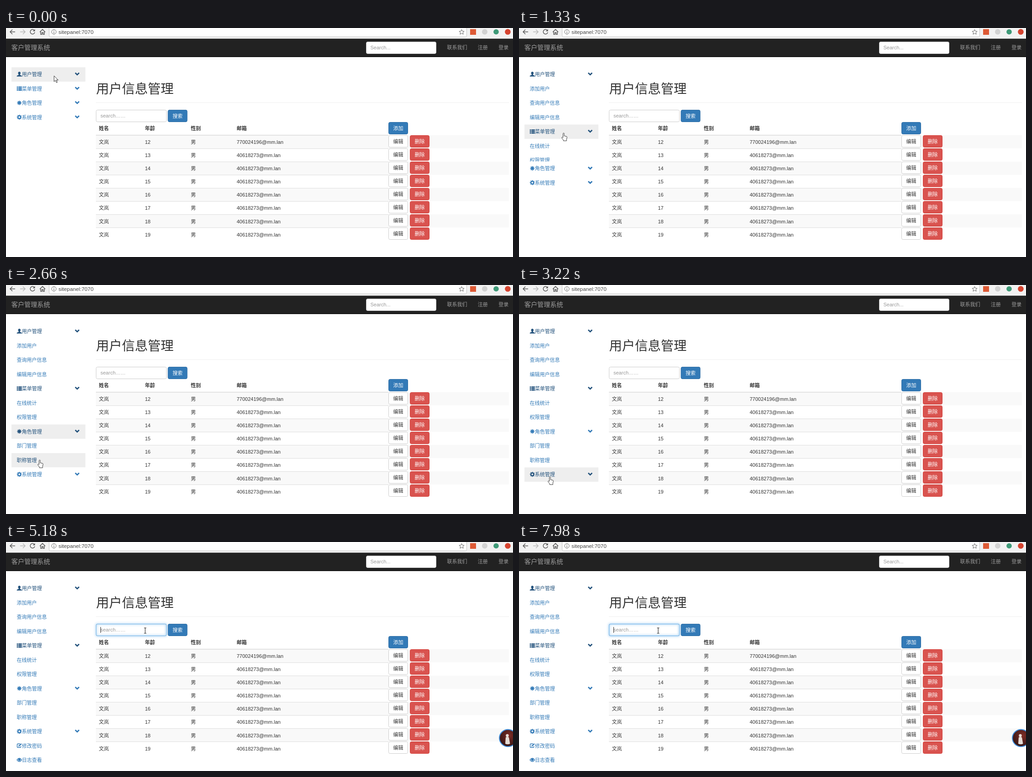
Recreate the animation shown at these times as an HTML page. Size 1111 by 504 pixels, loop 8 s.

```html
<!DOCTYPE html>
<html lang="zh-CN">
<head>
<meta charset="utf-8">
<title>客户管理系统</title>
<style>
  html, body { margin: 0; width: 100%; height: 100%; overflow: hidden; background: #fff; }
  #stage { display: block; width: 1111px; height: 504px; }
  text { font: 11px "Liberation Sans", "Noto Sans CJK SC", "Noto Sans CJK", sans-serif; fill: #333; white-space: pre; }
  .mid { text-anchor: middle; }
  .bold { font-weight: 700; }
  .nav { fill: #9d9d9d; }
  .hint { fill: #999; }
  .link { color: #337ab7; }
  .link.dark { color: #23527c; }
  .link text { fill: currentColor; }
  .link .bg { fill: none; }
  .link.on .bg { fill: #eee; }
  .line { fill: none; stroke: #5a5a5a; stroke-width: 1.5; }
</style>
</head>
<body>
<svg id="stage" viewBox="0 0 1111 504">
  <defs>
    <filter id="soft" x="-10%" y="-50%" width="120%" height="200%"><feGaussianBlur stdDeviation="2.4"/></filter>
    <radialGradient id="photo" cx=".6" cy=".35" r=".75">
      <stop offset="0" stop-color="#7d2c25"/><stop offset="1" stop-color="#2c1414"/>
    </radialGradient>
    <g id="user" fill="currentColor">
      <ellipse cy="-2.4" rx="2.7" ry="3.1"/>
      <path d="M-1.5 0h3v1.6l3.4 1.5q.7.4.7 2H-5.6q0-1.6.7-2l3.4-1.5z"/>
    </g>
    <path id="list" fill="currentColor" d="M-5.5-4.5h2.6v2.6h-2.6zM-2-4.5h7.5v2.6H-2zM-5.5-1.2h2.6v2.6h-2.6zM-2-1.2h7.5v2.6H-2zM-5.5 2.1h2.6v2.6h-2.6zM-2 2.1h7.5v2.6H-2z"/>
    <path id="star" fill="none" stroke="currentColor" stroke-width="1.9" d="M0-4.8V4.8M-4.8 0H4.8M-3.4-3.4 3.4 3.4M-3.4 3.4 3.4-3.4"/>
    <g id="cog" fill="none" stroke="currentColor">
      <circle r="3" stroke-width="2.3"/>
      <circle r="4.6" stroke-width="1.8" stroke-dasharray="1.8 1.813" stroke-dashoffset=".9"/>
    </g>
    <g id="edit" fill="none" stroke="currentColor" stroke-width="1.4">
      <path d="M2-4H-3.4q-1.3 0-1.3 1.3v5.4q0 1.3 1.3 1.3h5.4q1.3 0 1.3-1.3V1"/>
      <path stroke-width="2.2" d="M-1.6 1.4 4.8-4.2"/>
    </g>
    <g id="eye" fill="none" stroke="currentColor" stroke-width="1.3">
      <path d="M-5.2 0Q0-7.4 5.2 0 0 7.4-5.2 0z"/>
      <circle cy="-.5" r="2" fill="currentColor"/>
    </g>
  </defs>

  <rect width="1111" height="504" fill="#fff"/>
  <g id="browser">
    <rect width="1111" height="23.5" fill="#f2f2f2"/>
    <path d="M94.5-1V16.500q0 3 3 3H1006.500q3 0 3-3V-1z" fill="#fff" stroke="#c4c4c4"/>
    <path class="line" d="M20 8.500H9M14 3.500 9 8.500l5 5"/>
    <path class="line" style="stroke:#b9b9b9" d="M31 8.500H42M37 3.500l5 5-5 5"/>
    <path class="line" d="M62 5.200A5 5 0 1 0 63 9.500"/>
    <path d="M63.500 2.500v4.700h-4.700z" fill="#5a5a5a"/>
    <path class="line" d="M74 9 80 3l6 6M76 8v6h2.800v-4h2.500v4H84V8"/>
    <circle cx="105" cy="8.500" r="5" fill="none" stroke="#666"/>
    <path d="M105 7.800V11.500M105 5.300V6.600" stroke="#666" stroke-width="1.200"/>
    <path d="M998.500 3.300l1.600 3.700 4 .3-3 2.600 1 4-3.600-2.200-3.600 2.200 1-4-3-2.600 4-.3z" fill="none" stroke="#666"/>
    <rect x="1017" y="2.500" width="13" height="12.500" fill="#dd5a35"/>
    <circle cx="1049" cy="8.500" r="6" fill="#d2d2d2"/>
    <circle cx="1074" cy="8.500" r="5.800" fill="#3f9a78"/>
    <circle cx="1099.500" cy="8.500" r="6.300" fill="#d5432f"/>
  </g>
  <g id="page">
    <rect y="23.500" width="1111" height="40.500" fill="#222"/>
    <rect y="62.800" width="1111" height="1.200" fill="#080808"/>
  </g>
  <g id="menu"></g>
  <g id="avatar">
    <circle cx="1100" cy="431.500" r="18.800" fill="url(#photo)" stroke="#3d8bd8" stroke-width="2"/>
    <circle cx="1098.500" cy="426" r="3.200" fill="#e5dcd5"/>
    <path d="M1095 430q4-2 7 0l2.500 14q-5 2.500-10.500 0z" fill="#e5dcd5"/>
  </g>
  <g id="focus">
    <rect x="197.500" y="180.500" width="154" height="26" rx="3" fill="none" stroke="#66afe9" stroke-width="3" opacity=".6" filter="url(#soft)"/>
    <rect x="197.500" y="180.500" width="154" height="26" rx="3" fill="none" stroke="#66afe9"/>
  </g>
  <rect id="caret" x="207" y="187" width="1" height="13" fill="#222"/>
  <g id="pointer">
    <path id="arrow" d="M.3.300V13l3-2.700 2.200 5 2-.9-2.200-4.900h4z" fill="#fff" stroke="#222" stroke-width=".9"/>
    <path id="hand" d="M-1.500 10V1.500a1.300 1.300 0 0 1 2.600 0V6.500l5 1.100q1.300.4 1.100 2l-1 5v2.700H-.8v-1.800L-4.600 10.500q.6-2 2-.9z" fill="#fff" stroke="#222" stroke-width=".9"/>
    <path id="beam" d="M-2.500-6H-.6L0-5.500.6-6H2.500M0-5.500V5.500M-2.500 6H-.6L0 5.500.6 6H2.500" fill="none" stroke="#222" stroke-width="1.100"/>
  </g>
</svg>
<script>
const LOOP = 8000, STEP = 70, ROW = 31.5, TOP = 86.5;
const $ = id => document.getElementById(id);

function add(parent, tag, attrs, content) {
  const el = document.createElementNS('http://www.w3.org/2000/svg', tag);
  for (const k in attrs) el.setAttribute(k, attrs[k]);
  if (content) el.textContent = content;
  parent.appendChild(el);
  return el;
}

// Page content
const page = $('page');
const text = (x, y, s, cls = '', size = 11) =>
  add(page, 'text', { x, y, class: cls, style: `font-size:${size}px` }, s);
const box = (x, y, width, fill, stroke) =>
  add(page, 'rect', { x: x + .5, y: y + .5, width: width - 1, height: 26, rx: 3, fill, stroke });
function button(x, y, label, fill, stroke, color = '#fff') {
  box(x, y, 43, fill, stroke);
  text(x + 21.5, y + 17.5, label, 'mid').style.fill = color;
}

add($('browser'), 'text', { x: 115, y: 12.7, style: 'font-size:11.8px;fill:#444' }, 'sitepanel:7070');
text(11.8, 48.2, '客户管理系统', 'nav', 14.15);
box(789, 30, 154, '#fff', '#ccc');
text(798.5, 47.3, 'Search...', 'hint');
[[966.5, '联系我们'], [1033.7, '注册'], [1079.3, '登录']].forEach(([x, s]) => text(x, 47.2, s, 'nav'));

text(197.5, 144.3, '用户信息管理', '', 28.3);
add(page, 'rect', { x: 197, y: 163.5, width: 905, height: 1, fill: '#eee' });
box(197, 180, 155, '#fff', '#ccc');
text(207, 197.3, 'search……', 'hint');
button(354.5, 180, '搜索', '#337ab7', '#2e6da4');

const cols = [203.5, 304.5, 405, 505.5];
['姓名', '年龄', '性别', '邮箱'].forEach((s, i) => text(cols[i], 225.2, s, 'bold'));
for (let i = 0; i < 8; i++) {
  const y = 236 + i * 29.05, line = Math.round(y);
  if (i % 2 === 0) add(page, 'rect', { x: 197, y: line, width: 905, height: 29, fill: '#f9f9f9' });
  add(page, 'rect', { x: 197, y: line - (i ? 0 : 1), width: 641, height: i ? 1 : 1.6, fill: '#ddd' });
  const mail = i ? '40618273@mm.lan' : '770024196@mm.lan';
  ['文岚', 12 + i, '男', mail].forEach((s, c) => text(cols[c], y + 19.2, s));
}
button(838, 207, '添加', '#337ab7', '#2e6da4');
for (let i = 0; i < 8; i++) {
  const y = Math.round(236 + i * 29.05);
  button(838, y, '编辑', '#fff', '#ccc', '#333');
  button(885, y, '删除', '#d9534f', '#d43f3a');
}

// Side menu: when each section opens, gains and loses focus
const sections = [
  { icon: 'user', name: '用户管理', open: 100, from: 0, to: 1120, keep: true, subs: [['添加用户'], ['查询用户信息'], ['编辑用户信息']] },
  { icon: 'list', name: '菜单管理', open: 1160, from: 1120, to: 2030, keep: true, subs: [['在线统计'], ['权限管理']] },
  { icon: 'star', name: '角色管理', open: 2150, from: 2030, to: 3220, subs: [['部门管理'], ['职称管理']] },
  { icon: 'cog', name: '系统管理', open: 3340, from: 3220, to: 5110, subs: [['修改密码', 'edit'], ['日志查看', 'eye']] }
];

function link(parent, y, name, icon) {
  const g = add(parent, 'g', { class: 'link', transform: `translate(0 ${y})` });
  add(g, 'rect', { class: 'bg', x: 12, width: 162, height: ROW });
  if (icon) add(g, 'use', { href: '#' + icon, x: 29.2, y: 15.2 });
  add(g, 'text', { x: icon ? 34.7 : 23.6, y: 19.7 }, name);
  return g;
}

for (const s of sections) {
  s.g = add($('menu'), 'g', {});
  s.head = link(s.g, 0, s.name, s.icon);
  add(s.head, 'path', { d: 'M151.800 12.300 156 16.400l4.200-4.100', fill: 'none', stroke: 'currentColor', 'stroke-width': 2.8 });
  s.clip = add(s.g, 'svg', { x: 0, y: ROW, width: 180, height: 0, overflow: 'hidden' });
  s.items = s.subs.map(([name, icon], i) => link(s.clip, i * ROW, name, icon));
}

// CSS "ease" curve: cubic-bezier(.25, .1, .25, 1)
function ease(x) {
  if (x <= 0) return 0;
  if (x >= 1) return 1;
  const bez = (a, b, u) => 3 * a * u * (1 - u) ** 2 + 3 * b * u * u * (1 - u) + u ** 3;
  let lo = 0, hi = 1;
  for (let i = 0; i < 20; i++) {
    const u = (lo + hi) / 2;
    if (bez(.25, .25, u) < x) lo = u; else hi = u;
  }
  return bez(.1, 1, lo);
}

// Pointer tip: time, x, y
const path = [
  [0, 105, 105], [140, 105, 105], [560, 101, 147], [910, 98, 231], [1470, 98, 231],
  [1890, 95, 325], [2240, 95, 325], [2520, 84, 352], [2660, 74, 385], [2870, 70, 437],
  [3010, 68, 422], [3570, 68, 422], [3920, 303, 224], [3990, 306, 216], [4130, 320, 204.5],
  [4270, 320, 204.5], [4550, 305, 194.5], [LOOP, 305, 194.5]
];
function tipAt(t) {
  const i = path.findIndex(p => p[0] > t);
  const [t0, x0, y0] = path[i - 1], [t1, x1, y1] = path[i];
  const k = (t - t0) / (t1 - t0);
  return [x0 + (x1 - x0) * k, y0 + (y1 - y0) * k];
}

const show = (id, on) => { $(id).style.display = on ? '' : 'none'; };

function render(t) {
  const [x, y] = tipAt(t);
  const over = top => x >= 12 && x <= 174 && y >= top && y < top + ROW;
  let top = TOP;
  for (const s of sections) {
    const height = s.items.length * ROW * ease((t - s.open) / 350);
    const active = over(top) || (t >= s.from && t < s.to);
    s.g.setAttribute('transform', `translate(0 ${top})`);
    s.clip.setAttribute('height', height);
    s.head.classList.toggle('on', active);
    s.head.classList.toggle('dark', active || (s.keep && t >= s.from));
    s.items.forEach((item, i) => {
      const hit = over(top + ROW * (i + 1)) && y < top + ROW + height;
      item.classList.toggle('on', hit);
      item.classList.toggle('dark', hit);
    });
    top += ROW + height;
  }

  const inField = x > 197 && x < 352 && y > 180 && y < 207;
  const hand = x <= 174 && t >= 210;
  $('pointer').setAttribute('transform', `translate(${Math.round(x)} ${Math.round(y)})`);
  show('beam', inField);
  show('hand', hand);
  show('arrow', !inField && !hand);

  $('focus').style.opacity = ease((t - 5040) / 210);
  show('avatar', t >= 5110);
  const blink = [5600, 6090, 6580, 7070, 7560, 7980].filter(b => t >= b).length;
  show('caret', t >= 5110 && blink % 2 === 0);
}

function tick() {
  const t = performance.now() % LOOP;
  render(Math.floor(t / STEP) * STEP);
  requestAnimationFrame(tick);
}
tick();
</script>
</body>
</html>
```
